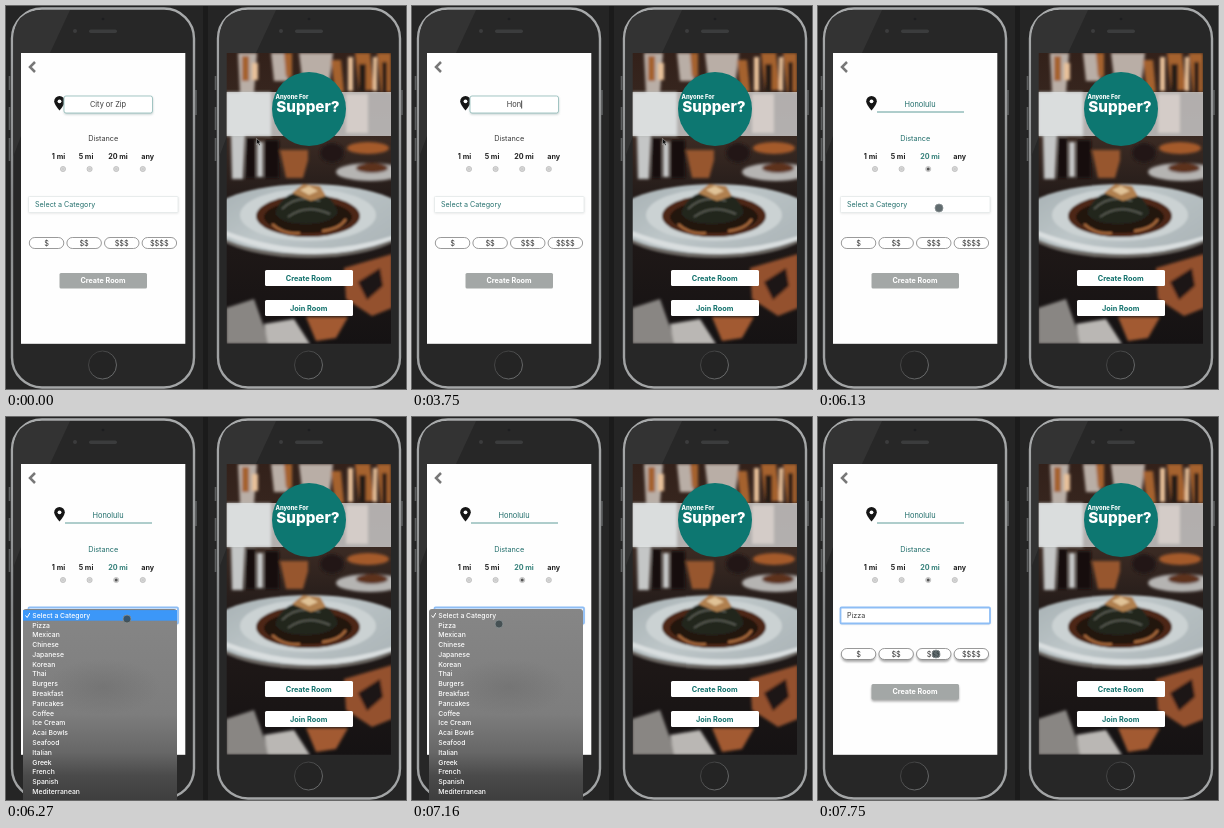
An HTML page for the animation above (8000 ms loop, 400 px wide and 383 px high).

```html
<!DOCTYPE html>
<html lang="en">
<head>
<meta charset="utf-8">
<title>Dinner room demo</title>
<style>
html, body { margin: 0; width: 100%; height: 100%; overflow: hidden; background: #232323; }
svg { display: block; width: 400px; height: 383px; font: 7.3px Inter, sans-serif; }
.mid { text-anchor: middle; }
.bold { font-weight: 700; }
.teal { fill: #11706b; }
.menu { font-size: 6.8px; font-weight: 500; fill: #fff; }
</style>
</head>
<body>
<svg viewBox="0 0 400 383">
  <defs>
    <linearGradient id="rim" x2="0" y2="1">
      <stop stop-color="#a9abac"/><stop offset=".5" stop-color="#858788"/><stop offset="1" stop-color="#a4a6a7"/>
    </linearGradient>
    <linearGradient id="ring" x2="1" y2="1">
      <stop stop-color="#333"/><stop offset="1" stop-color="#747677"/>
    </linearGradient>
    <linearGradient id="room" x2="0" y2="1">
      <stop stop-color="#33211a"/><stop offset=".3" stop-color="#3a2a23"/>
      <stop offset=".5" stop-color="#231b19"/><stop offset="1" stop-color="#151213"/>
    </linearGradient>
    <linearGradient id="plate" x2="1" y2=".5">
      <stop stop-color="#a3adb0"/><stop offset=".5" stop-color="#bdc6c8"/><stop offset="1" stop-color="#aeb7ba"/>
    </linearGradient>
    <linearGradient id="glass" x2="0" y2="1">
      <stop stop-color="#868686"/><stop offset=".55" stop-color="#7d7d7d"/><stop offset=".75" stop-color="#676767"/>
      <stop offset=".87" stop-color="#4b4b4b"/><stop offset="1" stop-color="#3e3e3e"/>
    </linearGradient>
    <radialGradient id="smudge">
      <stop stop-color="#555" stop-opacity=".25"/><stop offset="1" stop-color="#555" stop-opacity="0"/>
    </radialGradient>
    <radialGradient id="dot"><stop stop-color="#c4c4c4"/><stop offset="1" stop-color="#e4e4e4"/></radialGradient>
    <filter id="soft" x="-30%" y="-30%" width="160%" height="160%"><feGaussianBlur stdDeviation="1.7"/></filter>
    <filter id="blur" x="-30%" y="-30%" width="160%" height="160%"><feGaussianBlur stdDeviation=".8"/></filter>
    <clipPath id="screen"><path d="M220.700 47h164.300v290.800h-164.300z"/></clipPath>
    <g id="phone">
      <path d="M3.500 70v14M3.500 101v23M3.500 132v23M190 84v25" stroke="#5c5e5f" stroke-width="1.600"/>
      <rect x="6" y="2.500" width="182" height="379" rx="30" fill="#272727" stroke="url(#rim)" stroke-width="2.400"/>
      <path d="M7.500 150V34Q7.500 4 37 4H64L44 47H15V130z" fill="#333"/>
      <rect x="83" y="23.500" width="28" height="3.500" rx="1.700" fill="#3b3c3d"/>
      <circle cx="69" cy="25" r="2" fill="#3b3c3d"/>
      <circle cx="97" cy="13" r="1.300" fill="#1d1e20"/>
      <circle cx="96.500" cy="359" r="14" fill="#242424" stroke="url(#ring)"/>
    </g>
  </defs>
  <rect width="400" height="383" fill="#252525"/>
  <rect x="197" width="5" height="383" fill="#1b1b1b"/>
  <use href="#phone"/>
  <use href="#phone" x="206"/>

  <!-- welcome screen -->
  <g clip-path="url(#screen)">
    <rect x="220" y="47" width="166" height="291" fill="url(#room)"/>
    <g filter="url(#soft)">
      <path d="M232 47h19l-3 40h-14zM265 47h20l-3 28h-14zM293 47h34l-5 42h-24z" fill="#b9aea6"/>
      <path d="M236 50h7v25h-7zM278 47h8v24h-6zM325 54h10l3 32h-9zM349 47h15l4 37h-15zM371 47h14v39h-10z" fill="#a5622f"/>
      <path d="M246 57h6v17h-6zM342 51h5v34h-5zM367 51h4v34h-4z" fill="#e8c19a"/>
      <path d="M353 58h7v28h-7zM376 56h5v30h-5z" fill="#281b16"/>
      <path d="M220 86h45v44h-45z" fill="#b5b8b6"/>
      <path d="M340 88h22v39h-22z" fill="#a18472"/>
      <path d="M225 130h14l-2 43h-11zM251 136h6v35h-6z" fill="#c4c6c6"/>
      <path d="M240 132h9v40h-9zM259 134h14v38h-14z" fill="#17110f"/>
      <path d="M274 144h28v10l-5 18h-17z" fill="#97572f"/>
      <ellipse cx="326" cy="147" rx="12" ry="10" fill="#211814"/>
      <ellipse cx="362" cy="142" rx="21" ry="6" fill="#a45a29"/>
      <ellipse cx="364" cy="166" rx="34" ry="9" fill="#b5b4b2"/>
      <ellipse cx="366" cy="162" rx="16" ry="5" fill="#5d301c"/>
      <path d="M338 262l48-14v54l-20 8-26-17z" fill="#94512d"/>
      <path d="M352 276l22-14 3 18-16 14z" fill="#1e1412"/>
      <path d="M220 302l28-9 16 45h-44z" fill="#898683"/>
      <path d="M258 318l30-5 16 25h-42z" fill="#bab7b4"/>
      <path d="M300 311h42l-12 21-20 3z" fill="#a25a30"/>
    </g>
    <g filter="url(#blur)">
      <ellipse cx="303" cy="216" rx="102" ry="36" fill="#6c6864"/>
      <ellipse cx="303" cy="213" rx="102" ry="35" fill="url(#plate)"/>
      <path d="M220 225q83 32 166 5v4q-83 30-166-4z" fill="#d9dedf"/>
      <ellipse cx="302" cy="209" rx="68" ry="26" fill="#cbd2d3"/>
      <ellipse cx="302" cy="210" rx="52" ry="21" fill="#4d2815"/>
      <ellipse cx="302" cy="211" rx="44" ry="16" fill="#20120e"/>
      <path d="M266 218q12 11 28 9M316 225q18-2 24-12" fill="none" stroke="#a5673b" stroke-width="2.500"/>
      <path d="M269 208q5-21 31-24 27 2 32 23-8 11-32 11-24 0-31-10z" fill="#23251f"/>
      <path d="M276 203q15-15 38-8M282 211q18-14 42-3" fill="none" stroke="#61645a" stroke-width="1.500"/>
      <path d="M286 187l11-9 17 2 6 10-15 5z" fill="#b0804f"/>
      <path d="M294 184l9-4 9 5-9 4z" fill="#e0c297"/>
    </g>
    <rect x="220" y="86" width="166" height="44" fill="#eceff0" opacity=".68"/>
  </g>
  <circle cx="303" cy="103" r="37" fill="#0d7771"/>
  <g class="mid" fill="#fff" font-weight="800">
    <text x="286" y="93" font-size="5.8">Anyone For</text>
    <text x="302" y="106" font-size="15.2">Supper?</text>
  </g>
  <g fill="#fff">
    <rect x="259" y="264" width="88" height="16" rx="1.5"/>
    <rect x="259" y="294" width="88" height="16" rx="1.5"/>
  </g>
  <g class="mid bold teal">
    <text x="302.7" y="274.7">Create Room</text>
    <text x="302.7" y="304.5">Join Room</text>
  </g>

  <!-- create room form -->
  <rect x="15" y="47" width="164.300" height="290.800" fill="#fefefe"/>
  <path d="M29 56l-5 5 5 5" fill="none" stroke="#777" stroke-width="2.5"/>
  <path d="M53.500 104.500q-5.300-6-5.300-9.200a5.300 5.300 0 0 1 10.600 0q0 3.200-5.300 9.200z" fill="#151515"/>
  <circle cx="53.500" cy="95.300" r="1.900" fill="#fff"/>
  <g id="box">
    <rect x="58" y="91" width="89" height="17.500" rx="2" fill="#c4cfcf" filter="url(#blur)"/>
    <rect x="58" y="90" width="88.500" height="17" rx="2" fill="#fff" stroke="#8fb9b7" stroke-width=".8"/>
  </g>
  <path id="line" d="M59 106h87" stroke="#4c908d" stroke-width=".9"/>
  <text id="city" class="mid" x="102" y="101.200" font-size="7.4"></text>
  <path id="caret" d="M0 94.500v8" stroke="#333" stroke-width=".9"/>
  <text id="label" class="mid" x="97.200" y="135">Distance</text>
  <g id="miles"></g>
  <rect x="22.500" y="191" width="150" height="16.500" rx="1" fill="#e4e4e4" filter="url(#blur)"/>
  <rect id="select" x="22.500" y="190.500" width="149.500" height="16" rx="1" fill="#fff"/>
  <text id="choice" x="29" y="201.300" font-size="7.150"></text>
  <g id="shade" fill="#aaa" filter="url(#blur)"></g>
  <g id="prices"></g>
  <rect x="53.500" y="267" width="87.500" height="15.500" rx="1.500" fill="#a3a7a6"/>
  <text class="mid bold" x="97" y="277.300" fill="#fff" font-size="7.200">Create Room</text>

  <g id="menu">
    <path d="M17 383V195q0-3 3-3h148q3 0 3 3v188z" fill="url(#glass)"/>
    <ellipse cx="97" cy="270" rx="58" ry="28" fill="url(#smudge)"/>
    <rect id="bar" x="17" width="154" height="10.600" fill="#3c97f8"/>
    <path d="M19.500 198.500l1.700 2 2.600-4.500" fill="none" stroke="#fff"/>
  </g>
  <path id="arrow" d="M250.500 132.500v6l1.500-1.300 1.300 2.300 1-.6-1.200-2.200h2z" fill="#111" stroke="#ddd" stroke-width=".4"/>
  <circle id="pointer" r="4" fill="#344246" fill-opacity=".78" stroke="#8a9194" stroke-width=".8"/>
</svg>
<script>
const $ = id => document.getElementById(id);
const LOOP = 8000, TEAL = '#236f6c', INK = '#3c3c3c';

function add(parent, tag, attrs, text = '') {
  const el = document.createElementNS('http://www.w3.org/2000/svg', tag);
  for (const key in attrs) el.setAttribute(key, attrs[key]);
  el.textContent = text;
  return parent.appendChild(el);
}

const set = (id, attrs) => {
  for (const key in attrs) $(id).setAttribute(key, attrs[key]);
};
const show = (id, on) => set(id, { visibility: on ? 'visible' : 'hidden' });

// Latest value whose start time has passed
const at = (steps, t) => steps.reduce((value, [start, next]) => t >= start ? next : value, null);

const miles = ['1 mi', '5 mi', '20 mi', 'any'].map((name, i) => {
  const x = 57 + i * 26.6;
  add($('miles'), 'circle', { cx: x, cy: 163, r: 2.6, fill: 'url(#dot)', stroke: '#aaa', 'stroke-width': .6 });
  return add($('miles'), 'text', { x: [52.5, 80, 112, 141.7][i], y: 152.5, class: 'mid bold', 'font-size': 7.2 }, name);
});
add($('miles'), 'circle', { id: 'picked', cx: 110.2, cy: 163, r: 1.5, fill: '#555' });

for (let i = 0; i < 4; i++) {
  const x = 23.3 + i * 37.6;
  add($('shade'), 'rect', { x, y: 233, width: 34.5, height: 12, rx: 6 });
  add($('prices'), 'rect', { x, y: 231.5, width: 34.5, height: 11, rx: 5.5, fill: '#fff', stroke: '#808080', 'stroke-width': .8 });
  add($('prices'), 'text', { x: x + 17.2, y: 239.6, class: 'mid', fill: '#333' }, '$'.repeat(i + 1));
}
add($('shade'), 'rect', { x: 53.5, y: 269, width: 87.5, height: 15.5, rx: 2 });

const foods = ['Select a Category', 'Pizza', 'Mexican', 'Chinese', 'Japanese', 'Korean', 'Thai', 'Burgers',
  'Breakfast', 'Pancakes', 'Coffee', 'Ice Cream', 'Acai Bowls', 'Seafood', 'Italian', 'Greek', 'French',
  'Spanish', 'Mediterranean'];
const rowY = i => 198.3 + i * 9.78;
foods.forEach((name, i) => add($('menu'), 'text', { x: 26.3, y: rowY(i) + 2.5, class: 'menu' }, name));

const typed = [[0, ''], [2400, 'H'], [2550, 'Hon'], [2850, 'Honol'], [3150, 'Hono'], [3300, 'Ho'],
  [3750, 'Hon'], [3900, 'Hono'], [4050, 'Honol'], [4200, 'Honolu'], [4790, 'Honolulu']];
const caret = [[0, false], [300, true], [750, false], [1200, true], [1800, false], [2400, true], [5080, false]];
const pointer = [[5080, [268, 187]], [5230, [190, 175]], [5380, [110, 163]], [6130, [121, 202]],
  [6420, [110, 206]], [6570, [98, 214]], [6720, [90, 221]], [7010, [87, 207]],
  [7600, [103, 222]], [7750, [118, 237]]];
const hover = [[6270, 0], [6420, 1], [6570, 2], [7010, 1], [7160, -1]];

function draw(t) {
  const text = at(typed, t), left = t >= 6130, chosen = t >= 7450, focus = t >= 6270;
  const open = focus && !chosen;

  $('city').textContent = text || 'City or Zip';
  set('city', { fill: left ? TEAL : INK });
  const half = text ? $('city').getComputedTextLength() / 2 : 0;
  set('caret', { transform: `translate(${102.5 + half})` });
  show('caret', at(caret, t));
  show('box', !left);
  show('line', left);
  set('label', { fill: left ? TEAL : INK });
  miles.forEach((el, i) => el.setAttribute('fill', left && i === 2 ? '#35807a' : '#222'));
  show('picked', t >= 5530);

  set('select', { stroke: focus ? '#8dbdf5' : '#e4e9e9', 'stroke-width': focus ? 1.8 : .8 });
  $('choice').textContent = foods[chosen ? 1 : 0];
  set('choice', { fill: chosen ? INK : TEAL });
  show('shade', chosen);

  const row = at(hover, t);
  show('menu', open);
  show('bar', open && row >= 0);
  set('bar', { y: rowY(Math.max(row, 0)) - 5.2 });

  const spot = at(pointer, t);
  show('arrow', !spot);
  show('pointer', spot);
  if (spot) set('pointer', { cx: spot[0], cy: spot[1] });
}

const start = performance.now();
function tick() {
  draw((performance.now() - start) % LOOP);
  requestAnimationFrame(tick);
}
tick();
</script>
</body>
</html>
```
